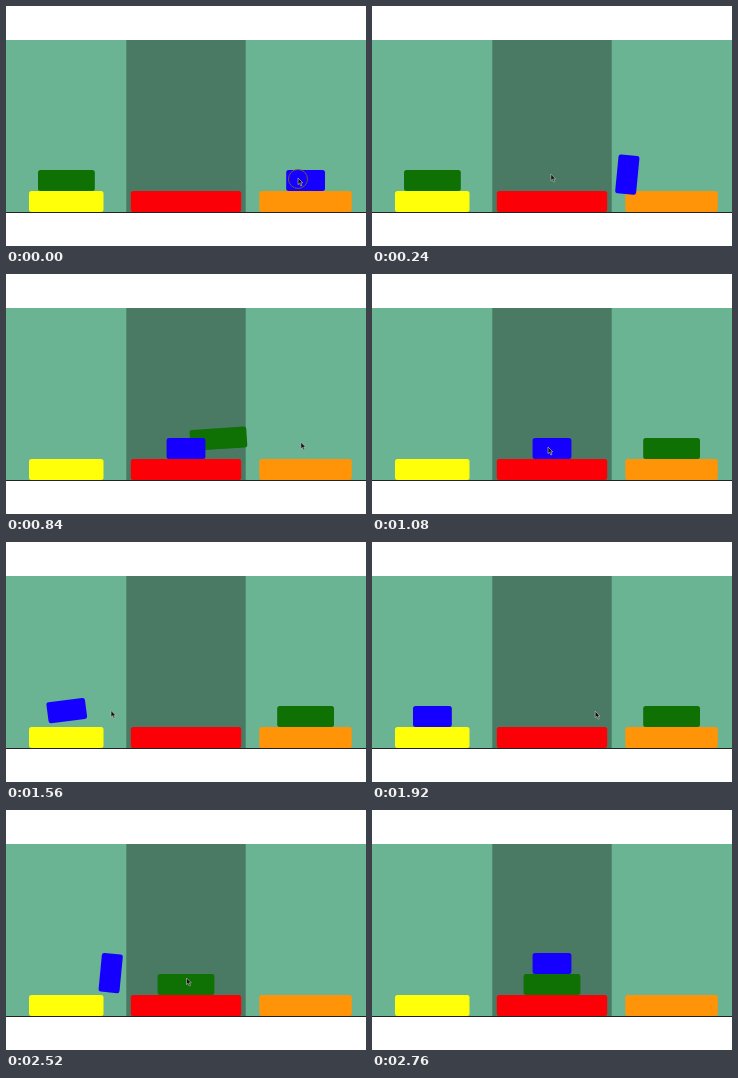
Recreate the animation shown at these times as an HTML page. Size 360x240 px, loop 2.88 s.

```html
<!DOCTYPE html>
<html lang="en">
<head>
<meta charset="utf-8">
<title>Stacking blocks</title>
<style>
  html, body { margin: 0; width: 100%; height: 100%; overflow: hidden; background: #fff; }
  svg { display: block; width: 360px; height: 240px; }
</style>
</head>
<body>
<svg viewBox="0 0 360 240">
  <rect y="34" width="360" height="172" fill="#6ab393"/>
  <rect x="120.3" y="34" width="119.4" height="172" fill="#4a7a64"/>
  <rect y="206" width="360" height="1" fill="#222"/>
  <rect x="23" y="185" width="74.5" height="21" rx="2.5" fill="#ffff0a"/>
  <rect x="124.8" y="185" width="110.4" height="21" rx="2.5" fill="#fb0007"/>
  <rect x="253.3" y="185" width="92.5" height="21" rx="2.5" fill="#ff9408"/>
  <g id="green"><rect x="-28.4" y="-10.5" width="56.8" height="21" rx="2.5" fill="#0f7003"/></g>
  <g id="blue"><rect x="-19.4" y="-10.5" width="38.8" height="21" rx="2.5" fill="#1500ff"/></g>
  <circle id="ring" cx="292" cy="173" r="9.5" fill="none" stroke="#6b5b3c"/>
  <path id="cursor" d="M0 0V6.6L1.6 5.2L2.8 8L4 7.5L2.8 4.8H4.8Z" fill="#111" stroke="#c8c8c8" stroke-width=".6"/>
</svg>
<script>
const LOOP = 2880, STEP = 120, HOP = 280, LIFT = 12;
const FLOOR = 174.5, BLOCK_H = 21, DROP_Y = 168;

// Each block is grabbed off-centre, dragged to a tower and dropped; then it hops there.
const moves = [
  { block: "blue",  from: 2, to: 1, press: 0,    drop: 200,  grab: [-7.6, -2.5] },
  { block: "green", from: 0, to: 2, press: 480,  drop: 760,  grab: [4.2, 0.5] },
  { block: "blue",  from: 1, to: 0, press: 1080, drop: 1320, grab: [-4, -1.5] },
  { block: "green", from: 2, to: 1, press: 1800, drop: 2000, grab: [-11.6, -3.5] },
  { block: "blue",  from: 0, to: 1, press: 2280, drop: 2480, grab: [7.7, -6], level: 1 }
];

const $ = id => document.getElementById(id);
const mix = (a, b, k) => a + (b - a) * k;
const towerX = i => 60.4 + 119.6 * i;
const move = (id, x, y, angle = 0) =>
  $(id).setAttribute("transform", `translate(${x} ${y}) rotate(${angle})`);
const show = (id, on) => { $(id).style.display = on ? "" : "none"; };

function placeBlock(id, t) {
  const own = moves.filter(m => m.block === id);
  const m = own.findLast(m => t >= m.drop) || own[0];
  const p = Math.min(1, Math.max(0, (t - m.drop) / HOP));
  const left = 1 - p;
  const x = mix(towerX(m.from), towerX(m.to), 1 - left ** 3);
  const rise = BLOCK_H * (m.level || 0) * (1 - left ** 2) + LIFT * 4 * p * left;
  move(id, x, FLOOR - rise, -360 * left ** 2);
}

const grabPoint = m => [towerX(m.from) + m.grab[0], FLOOR + m.grab[1]];

// Drags run evenly; the way to the next block starts slowly.
function placeCursor(t) {
  const i = moves.findLastIndex(m => t >= m.press);
  const m = moves[i], next = moves[(i + 1) % moves.length];
  const release = [towerX(m.to), DROP_Y];
  const dragging = t < m.drop;
  const [a, b] = dragging ? [grabPoint(m), release] : [release, grabPoint(next)];
  const k = dragging
    ? (t - m.press) / (m.drop - m.press)
    : ((t - m.drop) / ((next.press || LOOP) - m.drop)) ** 2.35;
  move("cursor", mix(a[0], b[0], k), mix(a[1], b[1], k));
}

function draw(now) {
  const t = Math.floor((now % LOOP) / STEP) * STEP;
  placeBlock("green", t);
  placeBlock("blue", t);
  placeCursor(t);
  show("ring", t < STEP);
  show("cursor", t < LOOP - STEP);
}

const origin = performance.now();
function tick() {
  draw(performance.now() - origin);
  requestAnimationFrame(tick);
}
tick();
</script>
</body>
</html>
```
